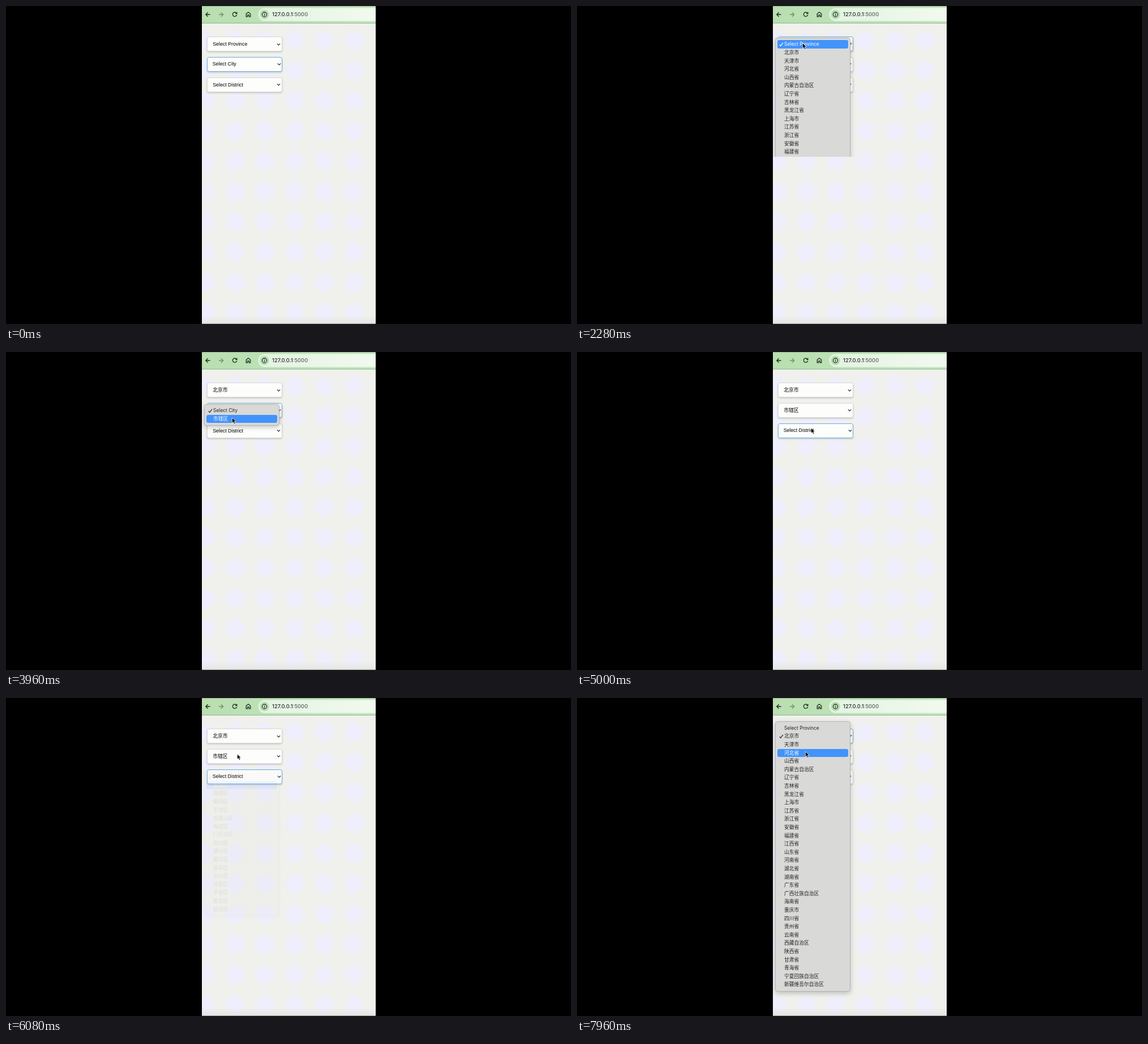
Recreate the animation shown at these times as an HTML page. Size 998 by 561 pixels, loop 8000 ms.

```html
<!DOCTYPE html>
<html lang="zh-CN">
<head>
<meta charset="utf-8">
<title>Region select</title>
<style>
  html, body { margin: 0; width: 100%; height: 100%; overflow: hidden; background: #000; }
  #stage { position: relative; width: 998px; height: 561px; overflow: hidden; }
  #page {
    position: absolute; left: 345.5px; top: 0; width: 307.5px; height: 561px; overflow: hidden;
    background: radial-gradient(circle at center, #eeeefd 0 11px, #eeeefd00 20px) -19.7px 33.3px / 52.4px 53.5px, #f0f0ed;
  }
  #page::after {
    content: ""; position: absolute; inset: 0; pointer-events: none;
    background: linear-gradient(#e6e6e600, #e6e6e6) bottom / 100% 14px no-repeat;
    border-bottom: 1px solid #97a08c; box-sizing: border-box;
  }
  svg { position: absolute; left: 0; top: 0; overflow: visible; }
  #shift { position: absolute; left: -345.5px; top: 0; width: 998px; height: 561px; }
  .url { font: 500 9.4px Inter, sans-serif; }
  .field {
    position: absolute; left: 355px; width: 133px; height: 26px; box-sizing: border-box;
    border: .8px solid #d9d9d9; border-radius: 3.5px; background: #fdfdfc;
    box-shadow: 0 1.5px 3px #0000002e; color: #000;
    font: 8.8px/24.6px "Liberation Sans", "Noto Sans CJK SC", "Noto Sans CJK", sans-serif;
    padding-left: 9.2px; white-space: nowrap;
  }
  .field.focus { border: 1.3px solid #69afe0; padding-left: 8.7px; line-height: 23.6px; }
  .field svg { left: auto; right: 2px; top: 9.5px; }
  .focus svg { right: 1.5px; top: 9px; }
  .menu {
    position: absolute; left: 349.5px; width: 133.3px; box-sizing: border-box; padding: 3.7px 3px;
    border: .6px solid #b4b4b4; border-radius: 4.5px; background: #d9d9d7;
    box-shadow: 0 3px 8px #00000038;
  }
  .row {
    position: relative; height: 14.6px; padding-left: 12.6px; border-radius: 3px; color: #222;
    font: 8.75px/14.6px "Noto Sans CJK SC", "Noto Sans CJK", sans-serif; white-space: nowrap;
  }
  .row.latin { font: 8.4px/14.6px Inter, sans-serif; }
  .row.hot { background: #4293fb; color: #fff; }
  .row svg { left: 3.4px; top: 3.6px; }
</style>
</head>
<body>
<div id="stage"><div id="page"><div id="shift">
  <svg width="998" height="32" fill="none" stroke="#1c2a1e" stroke-width="1.3">
    <defs>
      <linearGradient id="bar"><stop offset="0" stop-color="#b9deb0"/><stop offset="1" stop-color="#c3e8c0"/></linearGradient>
      <linearGradient id="pill"><stop offset="0" stop-color="#e3f3e2"/><stop offset="1" stop-color="#f3fbf0"/></linearGradient>
    </defs>
    <g stroke="none">
      <rect x="345" width="309" height="30" fill="url(#bar)"/>
      <rect x="345" width="309" height="1" fill="#93b58e"/>
      <rect x="345" y="29.7" width="309" height="1" fill="#83b587"/>
      <rect x="445.5" y="3.5" width="240" height="23" rx="11.5" fill="url(#pill)"/>
      <circle cx="456.5" cy="15" r="8.2" fill="#b9ddb3"/>
    </g>
    <path id="arrow" d="M360.5 15h-7.6M356.6 11.2L352.8 15l3.8 3.8"/>
    <path d="M376 15h7.6M379.9 11.2L383.7 15l-3.8 3.8" stroke="#72906f"/>
    <path d="M406.9 12.3A3.7 3.7 0 1 0 407.7 15.5M407.9 10.8v2.6h-2.9"/>
    <path d="M424.3 13.8L428 10.8l3.7 3v5.1h-2.4v-3.1h-2.6v3.1h-2.4z"/>
    <circle cx="456.5" cy="15" r="4.1" stroke-width="1.1"/>
    <path d="M456.5 14.5v2.7M456.5 12.5v1.1" stroke-width="1.1"/>
    <text class="url" x="470" y="18.3" fill="#222b24" stroke="none">127.0.0.1<tspan fill="#566259">:5000</tspan></text>
  </svg>
  <div id="ui"></div>
  <svg id="cursor" width="10" height="13">
    <path d="M.4 0v9.2l2.2-2 1.6 3.6 1.7-.7-1.6-3.5h3z" fill="#000" stroke="#fff" stroke-width=".7"/>
  </svg>
</div></div></div>
<script>
const LOOP = 8000, ROW = 14.6;
const provinces = ('Select Province,北京市,天津市,河北省,山西省,内蒙古自治区,辽宁省,吉林省,黑龙江省,上海市,江苏省,浙江省,' +
  '安徽省,福建省,江西省,山东省,河南省,湖北省,湖南省,广东省,广西壮族自治区,海南省,重庆市,四川省,贵州省,云南省,' +
  '西藏自治区,陕西省,甘肃省,青海省,宁夏回族自治区,新疆维吾尔自治区').split(',');
const cities = ['Select City', '市辖区'];
const districts = ('Select District,东城区,西城区,朝阳区,丰台区,石景山区,海淀区,门头沟区,房山区,通州区,顺义区,昌平区,' +
  '大兴区,怀柔区,平谷区,密云区,延庆区').split(',');

const ui = document.getElementById('ui');
const cursor = document.getElementById('cursor');

function add(parent, className, html = '') {
  const el = document.createElement('div');
  el.className = className;
  el.innerHTML = html;
  parent.append(el);
  return el;
}

const chevron = '<svg width="7" height="6" fill="none" stroke="#222" stroke-width="1.1"><path d="M.8 1.3l2.7 2.7 2.7-2.7"/></svg>';
const tick = '<svg width="8" height="8" fill="none" stroke="currentColor" stroke-width="1.2"><path d="M.8 4.2l2 2.4L6.8.8"/></svg>';

// values and focus: [start time, state]
const fields = [provinces, cities, districts].map((items, i) => {
  const el = add(ui, 'field', `<span></span>${chevron}`);
  el.style.top = 54 + 35.8 * i + 'px';
  return { el, label: el.firstChild, items, pickedAt: [3040, 4400, 6100][i] };
});
const focus = [[0, 1], [2240, 0], [3600, 1], [4960, 2], [7600, 0]];

const menus = [
  { items: provinces, checked: 0, y: 67.4, open: 2240, close: 2880, hot: [[0, 0], [2720, 1]] },
  { items: cities, checked: 0, y: 103.2, open: 3620, close: 4240, hot: [[0, 0], [3800, 1]] },
  { items: districts, checked: 0, y: 139, open: 5040, close: 5936, hot: [[0, 0], [5480, 1]] },
  { items: provinces, checked: 1, y: 67.4, open: 7660, close: LOOP, hot: [[0, 1], [7800, 2], [7880, 3]] }
];
for (const menu of menus) {
  menu.el = add(ui, 'menu');
  menu.height = menu.items.length * ROW + 8;
  menu.el.style.top = menu.y - menu.checked * ROW - ROW / 2 - 4.3 + 'px';
  menu.rows = menu.items.map((name, i) =>
    add(menu.el, i ? 'row' : 'row latin', (i === menu.checked ? tick : '') + name));
}

// pointer tip: [time, x, y]
const path = [
  [1280, 665, 330], [1920, 404, 70], [2280, 398, 65.5], [2600, 398, 66], [2840, 397, 82], [3000, 397, 90],
  [3360, 399, 101], [3640, 399, 101], [3920, 399, 116], [4320, 399, 117], [4640, 413, 134], [5280, 413, 134],
  [5600, 410, 152], [5920, 410, 151], [6080, 408, 99], [6400, 404, 65], [7680, 403, 65], [7920, 403, 94.5], [LOOP, 403, 94.5]
];

const clamp = v => Math.max(0, Math.min(1, v));
const stateAt = (steps, t) => steps.filter(([start]) => start <= t).pop()[1];

function pointAt(t) {
  const next = path.findIndex(([time]) => time > t);
  if (next < 1) return path[0].slice(1);
  const [t0, x0, y0] = path[next - 1], [t1, x1, y1] = path[next];
  const k = (t - t0) / (t1 - t0), e = k * k * (3 - 2 * k);
  return [x0 + (x1 - x0) * e, y0 + (y1 - y0) * e];
}

function render(t) {
  fields.forEach(({ el, label, items, pickedAt }, i) => {
    el.classList.toggle('focus', stateAt(focus, t) === i);
    label.textContent = items[t >= pickedAt ? 1 : 0];
  });
  for (const { el, rows, height, open, close, hot } of menus) {
    const shown = t >= open && t < close + 160;
    el.style.display = shown ? '' : 'none';
    if (!shown) continue;
    const unfold = clamp((t - open) / 96);
    el.style.clipPath = `inset(-14px -14px ${height - (height + 14) * unfold}px -14px)`;
    el.style.opacity = 1 - clamp((t - close) / 160);
    const active = stateAt(hot, t);
    rows.forEach((row, i) => row.classList.toggle('hot', i === active));
  }
  const [x, y] = pointAt(t);
  cursor.style.transform = `translate(${x}px, ${y}px)`;
}

const begin = performance.now();
function tickFrame() {
  render((performance.now() - begin) % LOOP);
  requestAnimationFrame(tickFrame);
}
tickFrame();
</script>
</body>
</html>
```
